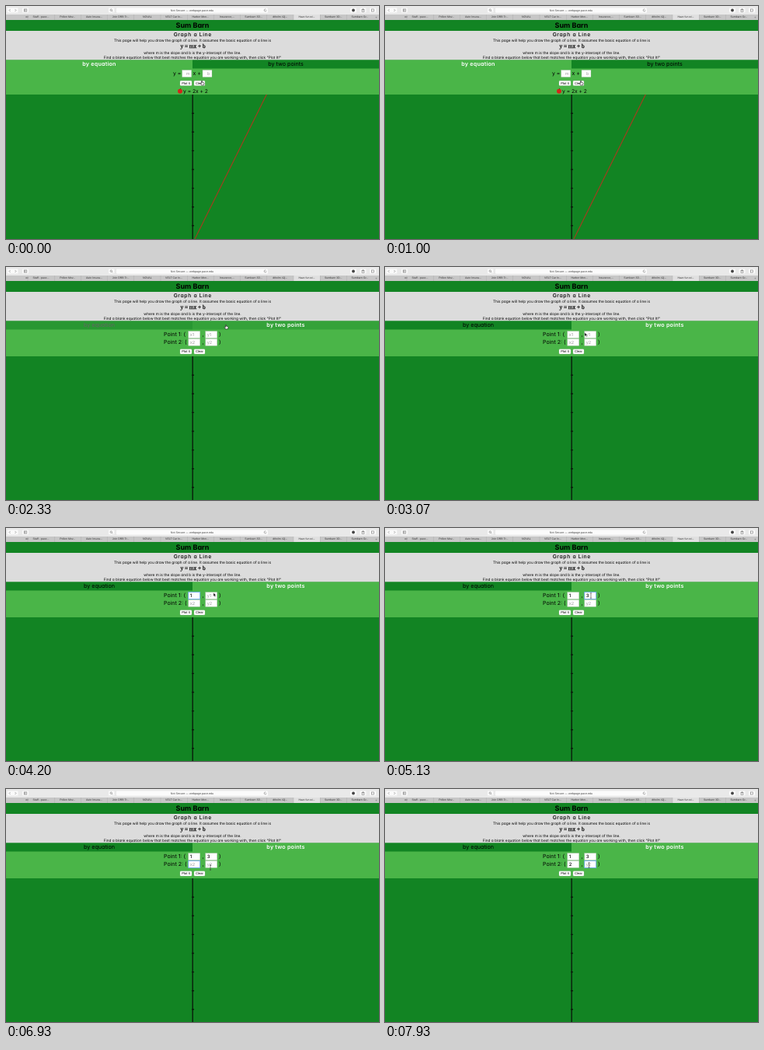
Write an HTML page that moves like this. It is 480 by 300 pixels and loops after 8000 ms.

```html
<!DOCTYPE html>
<html lang="en">
<head>
<meta charset="utf-8">
<title>Graph a Line</title>
<style>
html, body { margin: 0; width: 100%; height: 100%; overflow: hidden; background: #128423; }
svg { display: block; width: 480px; height: 300px; }
text { font-family: Inter, Lato, sans-serif; font-feature-settings: "cv11"; text-rendering: geometricPrecision; white-space: pre; }
.ui { font-family: "Liberation Sans", Arial, sans-serif; }
.math { font-family: "Liberation Serif", Times, serif; }
</style>
</head>
<body>
<svg viewBox="0 0 480 300"><g id="page"></g><g id="chrome"></g></svg>
<script>
const LOOP = 8000, DARK = [18, 132, 35], LIGHT = [74, 181, 72];
const BLACK = [0, 0, 0], WHITE = [255, 255, 255];
const rgb = c => `rgb(${c.map(Math.round)})`;
const clamp = v => Math.max(0, Math.min(1, v));
const mix = (a, b, k) => a.map((v, i) => v + (b[i] - v) * k);
const ramp = (t, from, to) => clamp((t - from) / (to - from));

const rect = (x, y, w, h, fill, more = '') =>
  `<rect x="${x}" y="${y}" width="${w}" height="${h}" fill="${fill}" ${more}/>`;
const path = (d, more) => `<path d="${d}" fill="none" ${more}/>`;
const text = (s, x, y, size, more = '') => `<text x="${x}" y="${y}" font-size="${size}" ${more}>${s}</text>`;
const mid = (s, x, y, size, more = '') => text(s, x, y, size, 'text-anchor="middle" ' + more);

function toolbar() {
  const thin = 'stroke="#777" stroke-width=".6"';
  let s = rect(0, 0, 480, 11, '#e9e9e9');
  for (const [x, w] of [[1.5, 14], [21, 8], [132, 7.5], [443, 8], [455.5, 8], [468, 8]])
    s += rect(x, 2.5, w, 6, '#fafafa', 'rx="1"');
  s += path('M5.6 4l-1.5 1.5 1.5 1.5M11.5 4l1.5 1.5-1.5 1.5', thin);
  s += rect(23.2, 4, 3.6, 3, 'none', thin) + path('M24.6 4v3', thin);
  s += '<circle cx="135.3" cy="5.2" r="1.2" fill="none" stroke="#777" stroke-width=".6"/>' + path('M136.2 6.1l1.2 1.2', thin);
  s += rect(142, 2.5, 195, 6.2, '#fbfbfb', 'rx="1.2"') + path('M334.4 4.3a1.4 1.4 0 1 0 .6 1.2', thin);
  s += mid('Not Secure — webpage.pace.edu', 239.5, 7, 3.7, 'class="ui" fill="#444"');
  s += '<circle cx="447" cy="5.5" r="1.9" fill="#444"/>' + rect(458, 4.4, 3, 3, 'none', thin) +
    path('M459.5 6V3', thin) + rect(470.5, 4, 3, 3, 'none', thin);
  return s;
}

function tabStrip() {
  let s = rect(0, 11, 480, 7, '#c6c6c6') + rect(370, 11, 34, 7, '#e0e0e0');
  const labels = ['ov', 'Staff - pace...', 'Pollen Mov...', 'Auto Insura...', 'Join ORB Tr...', 'NOVAL',
    'VELT Car In...', 'Harbor Mon...', 'Insurance,...', 'Sumbarn 3D...', 'dtholm 42j...', 'Have fun wi...',
    'Sumbarn 3D...', 'Sumbarn Gr...'];
  labels.forEach((label, i) => {
    const x = i ? 45 + (i - 1) * 34.2 : 27;
    s += mid(label, x, 15.3, 3.5, 'class="ui" fill="#333"');
    if (i) s += rect(x - 17.2, 11, .4, 7, '#aaa');
  });
  return s + mid('+', 476.5, 15.6, 4, 'class="ui" fill="#555"');
}

function header() {
  return rect(0, 18, 480, 14, rgb(DARK)) + rect(0, 32, 480, 37.3, '#dcdcdc') +
    mid('Sum Barn', 240, 28.1, 9, 'font-weight="700"') +
    mid('Graph a Line', 240.3, 39, 6.8, 'font-weight="500" letter-spacing=".65"') +
    mid('This page will help you draw the graph of a line. It assumes the basic equation of a line is', 240, 45.5, 4.78) +
    mid('y = mx + b', 240.5, 54, 7.3, 'class="math" stroke="#000" stroke-width=".25"') +
    mid('where m is the slope and b is the y-intercept of the line.', 240, 62.2, 4.78) +
    mid('Find a blank equation below that best matches the equation you are working with, then click "Plot It!"', 240, 68.4, 4.78);
}

function field(x, y, w, hint, { value, focused, indent = 2 } = {}) {
  const ring = focused ? 'stroke="#6fa9ea" stroke-width=".9"' : 'stroke="#a9b5a9" stroke-width=".3"';
  return rect(x, y, w, 9, '#fff', ring) +
    (value ? text(value, x + 2, y + 6.7, 6, 'font-weight="500"') : text(hint, x + indent, y + 6.5, 5.6, 'fill="#a0a0a0"'));
}

const button = (s, x, y, w) =>
  rect(x, y, w, 6.2, '#fff', 'rx="1" stroke="#bbb" stroke-width=".3"') + mid(s, x + w / 2, y + 4.5, 4.2, 'class="ui"');

const buttons = y => button('Plot It', 224, y, 15) + button('Clear', 242, y, 14);

const tab = (s, x, fill, ink, active) => rect(x, 69.3, 240, 11.2, rgb(fill)) +
  mid(s, x + 120, 77.4, 7.2, `fill="${rgb(ink)}" ` + (active ? 'font-weight="600" letter-spacing=".2"' : ''));

function graph(top, plotted) {
  let d = `M240.2 ${top}V300`;
  for (let y = top + 24.2; y < 300; y += 24.1) d += `M239 ${y}h3`;
  return rect(0, top, 480, 300 - top, rgb(DARK)) + path(d, 'stroke="#0b1c0c" stroke-width="1.4"') +
    (plotted ? path('M335.3 114L243 300', 'stroke="#a83a1e" stroke-width="1.1"') : '');
}

function equationPanel(plotted) {
  let s = text('y =', 215, 89.4, 6.8) + field(226.7, 82.5, 12, 'm', { indent: 5 }) +
    text('x +', 240.5, 89.4, 7) + field(253, 82.5, 12, 'b', { indent: 6 }) + buttons(96.3);
  if (plotted)
    s += '<circle cx="224" cy="109.8" r="3" fill="#d3261b"/>' +
      path('M224 107.2l1-1.4', 'stroke="#3d2a12" stroke-width=".7"') + text('y = 2x + 2', 228, 112, 6.7);
  return s;
}

function pointsPanel(t) {
  const focus = t < 3400 ? '' : t < 4670 ? 'x1' : t < 5900 ? 'y1' : t < 7670 ? 'x2' : 'y2';
  const values = { x1: t >= 3900 && '1', y1: t >= 4930 && '3', x2: t >= 7200 && '2' };
  let s = '';
  for (const n of [1, 2]) {
    const y = 72.8 + n * 9.8, base = y + 6.7;
    s += text(`Point ${n}: (`, 203, base, 7) + text(',', 252.5, base, 7) + text(')', 274, base, 7);
    for (const [axis, x] of [['x', 234.7], ['y', 256.7]]) {
      const id = axis + n;
      s += field(x, y, 15, id, { value: values[id], focused: focus === id });
    }
  }
  return s + buttons(105.8);
}

// time, x, y
const TRACK = [[0, 252, 98], [1250, 252, 98], [1650, 283, 76], [2930, 283, 76], [3130, 250, 88], [3450, 244, 89],
  [3980, 244, 89], [4180, 267, 84.5], [4530, 267, 84.5], [4670, 265, 87], [5130, 265, 87], [5750, 245, 97],
  [6400, 245, 97], [6730, 263, 101], [7400, 263, 101], [7500, 262.5, 98], [8000, 262.5, 98]];

function cursor(t) {
  const i = TRACK.findIndex(k => k[0] > t), a = TRACK[i - 1], b = TRACK[i];
  const k = ramp(t, a[0], b[0]), [x, y] = mix(a.slice(1), b.slice(1), k * k * (3 - 2 * k));
  const typing = [[3900, 3980], [4930, 5130], [7200, 7400]].some(([from, to]) => t >= from && t < to);
  if (typing) return '';
  const at = d => `<g transform="translate(${x} ${y})">${d}</g>`;
  if (t >= 4600 || (t >= 3300 && t < 4000))
    return at(path('M-1-3.2h2M0-3.2v6.4M-1 3.2h2', 'stroke="#333" stroke-width=".6"'));
  if (t < 3000)
    return at('<path d="M-.5-1.5q.6-.6 1 0v1.7l2 .6q.6.3.4 1.3l-.5 1.8h-2.7l-1.6-2.3q0-.8.9-.4l.5.4z" fill="#fff" stroke="#111" stroke-width=".6"/>');
  return at('<path d="M0-1v4.6l1.1-1 .8 1.7.8-.4-.8-1.6h1.5z" fill="#111" stroke="#fff" stroke-width=".3"/>');
}

function page(t) {
  const plotted = t < 1200, points = t >= 2070;
  const bottom = plotted ? 114 : points ? 115 : 105;
  const swap = ramp(t, 2070, 2500), hover = ramp(t, 1560, 1800);
  return rect(0, 80, 480, bottom - 80, rgb(LIGHT)) + graph(bottom, plotted) +
    tab('by equation', 0, mix(LIGHT, DARK, swap), mix(WHITE, BLACK, swap), !points) +
    tab('by two points', 240, mix(DARK, LIGHT, swap), mix(BLACK, WHITE, hover), points) +
    (points ? pointsPanel(t) : equationPanel(plotted)) + cursor(t);
}

const stage = document.getElementById('page');
document.getElementById('chrome').innerHTML = toolbar() + tabStrip() + header();
const start = performance.now();
function draw() {
  stage.innerHTML = page((performance.now() - start) % LOOP);
  requestAnimationFrame(draw);
}
draw();
</script>
</body>
</html>
```
